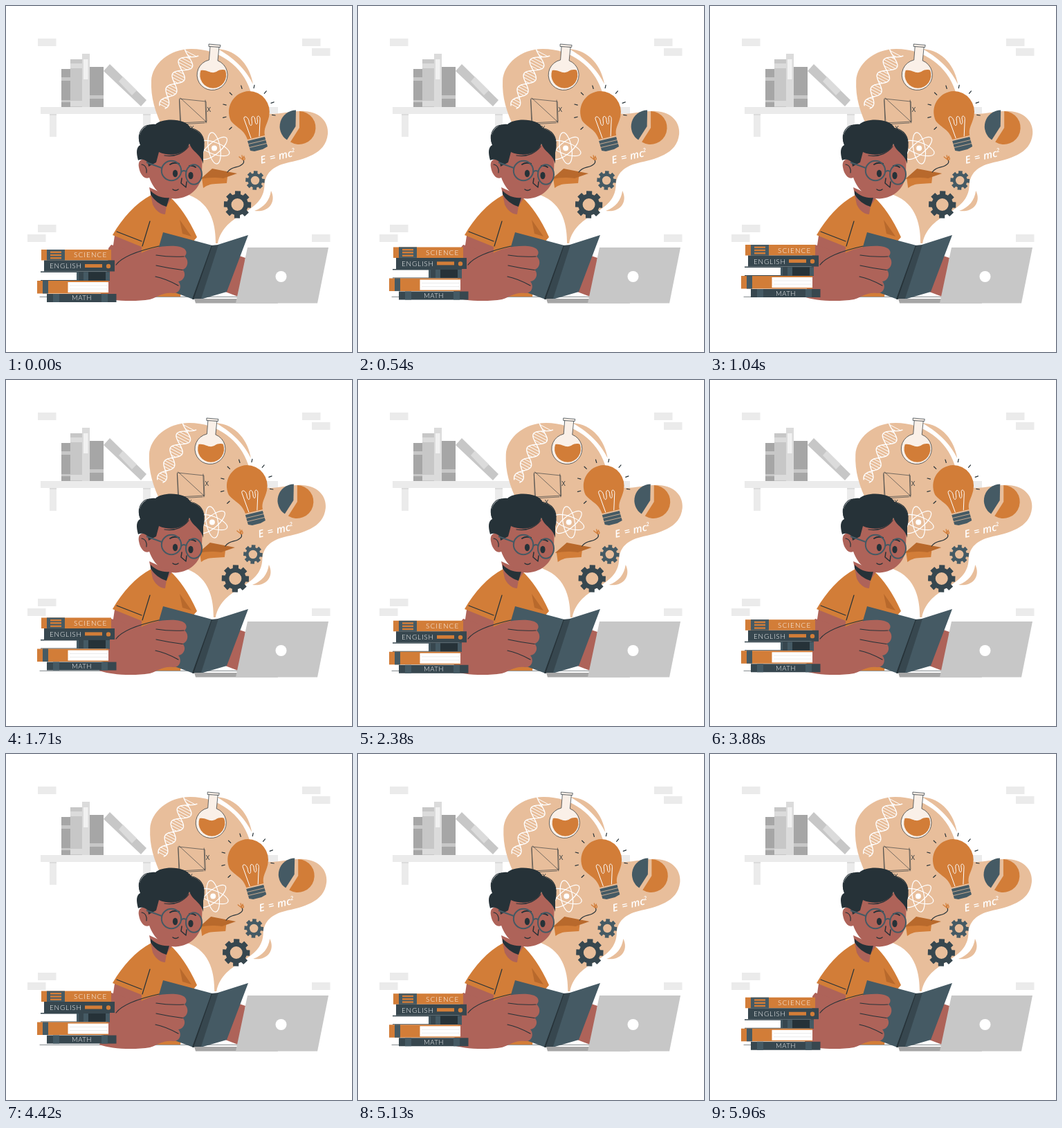
These frames come from a looping animation (500x500 px, 6 s). An HTML page:

```html
<!DOCTYPE html>
<html lang="en">
<head>
<meta charset="utf-8">
<title>Reading and thinking</title>
<style>
html, body { margin: 0; width: 100%; height: 100%; overflow: hidden; background: #fff; }
svg { display: block; width: 100vw; height: 100vh; }
.orange { fill: #d27d38; }
.rust { fill: #b8692c; }
.slate { fill: #455a64; }
.steel { fill: #37474f; }
.ink { fill: #263238; }
.skin { fill: #ae6359; }
.cloud { fill: #e8be9b; }
.white { fill: #fff; }
.pale { fill: #ebebeb; }
.light { fill: #dbdbdb; }
.mid { fill: #c7c7c7; }
.grey { fill: #a6a6a6; }
.line { fill: none; stroke: #263238; stroke-width: 1.2; stroke-linecap: round; stroke-linejoin: round; }
.thin { stroke-width: .6; }
.chalk { fill: none; stroke: #fff; stroke-width: 1.4; stroke-linecap: round; stroke-linejoin: round; }
.rim { fill: none; stroke: #455a64; stroke-width: 2; }
.title { font: 300 10px Lato, sans-serif; letter-spacing: 1.1px; fill: #fff; }
.formula { font: italic 600 15px "Open Sans", sans-serif; fill: #fff; }
.label { font: 9.5px "Open Sans", sans-serif; fill: #263238; }
</style>
</head>
<body>
<svg viewBox="0 0 500 500">
  <!-- wall and shelf -->
  <g id="bricks" class="pale"></g>
  <path class="pale" d="M50 146H393V156H209V189H198V156H73V189H63V156H50Z"/>
  <path class="light" d="M63 156H73V158H63ZM198 156H209V158H198Z"/>
  <path class="grey" d="M80 91H93V146H80Z"/>
  <path class="mid" d="M93 77H110V146H93ZM80 103H93V108H80ZM80 136H93V139H80Z"/>
  <path class="light" d="M110 69H121V146H110ZM93 83H110V90H93ZM93 137H110V145H93Z"/>
  <path fill="#f1f1f1" d="M112 77H118.500V106H112Z"/>
  <path class="grey" d="M121 88H141V146H121Z"/>
  <path class="mid" d="M121 129H141V134H121ZM141 94L150 84L203 136L195 145Z"/>
  <path class="light" d="M163 109L169 102L189 122L182 129Z"/>

  <!-- floor -->
  <path class="line thin" d="M49 420.300H335"/>

  <!-- thoughts -->
  <g id="thoughts">
    <g class="cloud">
      <path d="M303 343C303 320 299 286 264 273C250 266 238 225 228 180C215 152 209 132 210 108C211 84 236 62 268 62C309 62 342 88 353 122C361 144 370 156 384 156C400 156 415 151 432 152C455 154 466 168 465 185C462 215 430 221 405 227C385 232 375 242 373.500 258C373 302 316 296 306 343Z"/>
      <path d="M306 62C336 64 353 88 357 113C349 97 335 78 306 62Z"/>
      <path d="M383 267C391 283 380 299 359 296C373 291 381 281 383 267Z"/>
    </g>
    <g id="dna" class="chalk"></g>

    <path d="M295 58L293.500 78A22 22 0 1 0 306 79L308 59Z" fill="#faf0e8" stroke="#263238" stroke-width=".7"/>
    <path d="M293 55L310 56.500L309.500 59.500L293 58.500Z" fill="#faf0e8" stroke="#263238" stroke-width=".7"/>
    <path class="orange" d="M281.500 93C290 91 296 99 304 95C310 91 315 92 317 93A19 19 0 1 1 281.500 93Z"/>

    <path class="line thin" d="M251 134L289 138L290 167L252 169ZM252 133L290 168M250.500 136L253 171L287 169M288 136L289 169"/>
    <text class="label" x="290.500" y="153">X</text>
    <text class="label" x="266" y="180">X</text>

    <g id="atom" class="chalk" transform="translate(301 205.500)"></g>

    <path class="orange" d="M351 123A30 30 0 0 1 380 160C377 172 372 177 374 187L349 193C344 178 334 177 325 166A30 30 0 0 1 351 123Z"/>
    <path class="slate" d="M349 195L374 189L378 203L371 207L359 210L353 209Z"/>
    <path class="chalk" style="stroke-width:.8;stroke:#e8be9b" d="M350.500 199.500L375.500 193.500M352 204.500L377 198.500"/>
    <path class="chalk" style="stroke-width:1" d="M354 191L345 166C341 158 349 158 351 166C352 176 357 174 355 165C354 157 360 158 360 166C361 174 365 171 363 163C362 157 368 158 367 165L366 188"/>
    <g id="rays" class="line"></g>

    <path class="orange" d="M424 152A24 24 0 1 1 411 196.500L424 176Z"/>
    <path class="slate" d="M419 150.500L418.500 174L406 193.500A23.500 23.500 0 0 1 419 150.500Z"/>

    <text class="formula" transform="translate(368.500 228) rotate(-13)">E<tspan x="14">=</tspan><tspan x="27">mc</tspan><tspan dy="-6" font-size="8">2</tspan></text>

    <path class="orange" d="M283 248L320 247L319 256L303 257C295 257 289 260 285 263Z"/>
    <path class="rust" d="M298 235L334 242L314 249C301 247 291 248 281 250Z"/>
    <path class="line" d="M320 240C326 232 332 234 338 231C344 228 345 225 342 221"/>
    <path class="line" style="stroke:#d27d38;stroke-width:1.300" d="M342 222L337 218M342 222L341 216M342 222L344 217M342 222C346 224 346 219 343 218"/>
    <path id="bigGear" class="steel" fill-rule="evenodd"/>
    <path id="smallGear" class="slate" fill-rule="evenodd"/>
  </g>

  <!-- reader -->
  <path class="skin" d="M158 325L200 335L196 380H150Z"/>
  <path class="orange" d="M210 273C187 285 168 307 154 331L196 348L194 420H252L262 350L276 334C264 307 250 288 238 277Z"/>
  <path class="rust" d="M251 309L268 333L255 329Z"/>
  <path class="skin" d="M207 262L212 287C217 297 224 301 230 301L232 289L240 277Z"/>
  <path class="ink" d="M209 267C217 275 226 278 236 277L232 290C222 287 214 281 209 272Z"/>
  <path class="line" d="M160 326L196 340M208 311L197 347"/>
  <path class="skin" d="M205 215L206 244C211 264 226 278.500 245 278.500C268 277 283 261 283 240L284 210L240 188Z"/>
  <path class="skin" d="M207 226C198 218 190 222 192 233C194 245 201 251 207 248Z"/>
  <path class="line" d="M196 229C202 230 204 236 203 241"/>
  <path class="ink" d="M206 232L205 226C200 221 195 221 191 223C188 212 188 204 194 201C188 186 199 169 216 171C226 161 262 162 267 177C284 180 290 197 285 212L285 228C281 213 270 212 265 199C260 214 238 219 221 211L217 226Z"/>
  <path class="line" d="M193 196C190 182 198 172 208 172M229 216C246 219 258 211 264 203M262 176C277 176 286 186 286 198"/>
  <ellipse class="ink" cx="244.500" cy="242" rx="3.600" ry="5.200"/>
  <ellipse class="ink" cx="267" cy="245" rx="3.600" ry="5.200"/>
  <path class="line" style="stroke-width:2" d="M237 229Q243 225 250 228M265 231Q270 230 274 233"/>
  <path class="line" style="stroke-width:1.500" d="M254 249L253 256L260 262L261 254M241 265Q245 268 249 265"/>
  <circle class="rim" cx="239" cy="238" r="14.200"/>
  <ellipse class="rim" cx="271.500" cy="243.500" rx="11.500" ry="14.200"/>
  <path class="rim" d="M225 234L203 226M253 240Q257 236 261 240"/>

  <!-- open book and laptop -->
  <path class="skin" d="M337 361L346 364L338 421L317 413Z"/>
  <path class="slate" d="M227 327L298 346L271 424L206 400ZM306 345L350 331L319 413L281 424Z"/>
  <path class="steel" d="M297 346L307 345L282 423L270 424Z"/>
  <path class="ink" d="M297 346L298 346L271 424L269 423.500Z"/>
  <path class="skin" d="M152 345L194 358C206 351 224 346 245 347C260 348 264 356 258 362C265 367 263 379 255 381C261 386 258 397 249 398C255 405 251 416 241 415C228 413 220 420 208 424C184 428 150 426 135 420C142 408 148 385 148 350Z"/>
  <path class="line" d="M159 374C168 362 194 353 221 347M217 360Q235 363 257 362M217 375Q235 379 255 381.500M216 391Q231 394 249 404"/>
  <path class="grey" d="M272 423H393V429.500H274Z"/>
  <path class="mid" d="M349 349H466L450 429.500H332Z"/>
  <circle class="white" cx="397.500" cy="391" r="8"/>

  <!-- stacked books -->
  <g id="stack">
    <path class="orange" d="M51 352H152V367.500H51Z"/>
    <path class="slate" d="M59 352H85V367.500H59Z"/>
    <path class="orange" d="M64 354.500H80V357H64ZM64 358.700H80V361.200H64ZM64 363H80V365.500H64Z"/>
    <text class="title" x="98" y="363.500">SCIENCE</text>
    <path class="steel" d="M55 367.500H157V383.500H55Z"/>
    <path class="orange" d="M114 373H139V378H114Z"/>
    <circle class="orange" cx="148" cy="376" r="3.200"/>
    <text class="title" style="letter-spacing:.8px" x="63" y="379.500">ENGLISH</text>
    <path class="steel" d="M50 383.500H150V397H50Z"/>
    <path class="white" d="M50 385H102V396H50Z"/>
    <path class="slate" d="M102 384.500H105V396.500H102ZM112 384.500H119V396.500H112ZM144 384.500H150V396.500H144Z"/>
    <path class="ink" d="M119 384.500H144V396.500H119Z"/>
    <path class="orange" d="M45 397H148V415.500H45Z"/>
    <path class="slate" d="M53 397H61V415.500H53Z"/>
    <path class="white" d="M89.500 399H148V414H89.500Z"/>
    <path d="M92 404H147M92 409H147" stroke="#e3e3e3" stroke-width=".7"/>
    <path class="steel" d="M59 416H159.500V428H59Z"/>
    <path class="slate" d="M68 416H77V428H68ZM138 416H147V428H138Z"/>
    <text class="title" style="font-size:9.500px;letter-spacing:.5px" x="95" y="425.500">MATH</text>
  </g>
</svg>
<script>
const $ = id => document.getElementById(id);
const polar = (r, a) => [r * Math.cos(a), r * Math.sin(a)];
const polyline = pts => 'M' + pts.map(p => p.map(v => v.toFixed(2)).join(' ')).join('L');
const range = n => Array.from({ length: n }, (_, i) => i);
const path = d => `<path d="${d}"/>`;

$('bricks').innerHTML = [[46, 47], [428, 47], [442, 61], [46, 316], [31, 330], [442, 330]]
  .map(([x, y]) => `<rect x="${x}" y="${y}" width="26.500" height="11"/>`).join('');

// Double helix along a straight axis, wider at the top
function helixPoint(u, side) {
  const swing = side * (6.5 + 6 * u) * Math.sin(u * Math.PI * 4.1 + 0.8);
  return [226 + 42 * u + 0.87 * swing, 146 - 79 * u + 0.46 * swing];
}
const strand = side => path(polyline(range(61).map(i => helixPoint(i / 60, side))));
const rungs = range(23).map(i => (i + 0.5) / 23)
  .map(u => path(polyline([helixPoint(u, 1), helixPoint(u, -1)]))).join('');
$('dna').innerHTML = strand(1) + strand(-1) + `<g stroke-width="1">${rungs}</g>`;

$('atom').innerHTML = [20, 80, 140]
  .map(a => `<ellipse rx="23" ry="8.500" stroke-width="1.200" transform="rotate(${a})"/>`).join('')
  + '<circle r="4" class="white" stroke="none"/>';

$('rays').innerHTML = range(9).map(i => {
  const a = (-223 + 29 * i) * Math.PI / 180;
  return path(polyline([34, 38.5].map(r => {
    const [x, y] = polar(r, a);
    return [351 + x, 152 + y];
  })));
}).join('');

function gear(cx, cy, outer, root, hole, turn) {
  const pts = range(32).map(i => {
    const k = i % 4;
    const a = (Math.floor(i / 4) + [-0.34, -0.26, 0.26, 0.34][k]) * Math.PI / 4 + turn;
    const [x, y] = polar(k === 1 || k === 2 ? outer : root, a);
    return [cx + x, cy + y];
  });
  return polyline(pts) + `ZM${cx - hole} ${cy}a${hole} ${hole} 0 1 0 ${2 * hole} 0a${hole} ${hole} 0 1 0 ${-2 * hole} 0Z`;
}
$('bigGear').setAttribute('d', gear(334.5, 287, 20, 15.5, 9, 0.03));
$('smallGear').setAttribute('d', gear(360, 252, 14, 10.5, 6.2, 0.06));

const LOOP = 6000;
const SHAKE = [0, -1, 2, -4, 4, -4, 4, -4, 2, -1, 0];

function shakeAt(t) {
  const s = t / LOOP * 10, i = Math.floor(s);
  return SHAKE[i] + (SHAKE[i + 1] - SHAKE[i]) * (s - i);
}
// Linear rise and fall, 10 units every half loop
const liftAt = t => -10 * (1 - Math.abs(1 - (t % 3000) / 1500));

function draw(now) {
  const t = now % LOOP;
  $('thoughts').setAttribute('transform', `translate(${shakeAt(t)} 0)`);
  $('stack').setAttribute('transform', `translate(0 ${liftAt(t)})`);
}

const start = performance.now();
function tick() {
  draw(performance.now() - start);
  requestAnimationFrame(tick);
}
tick();
</script>
</body>
</html>
```
